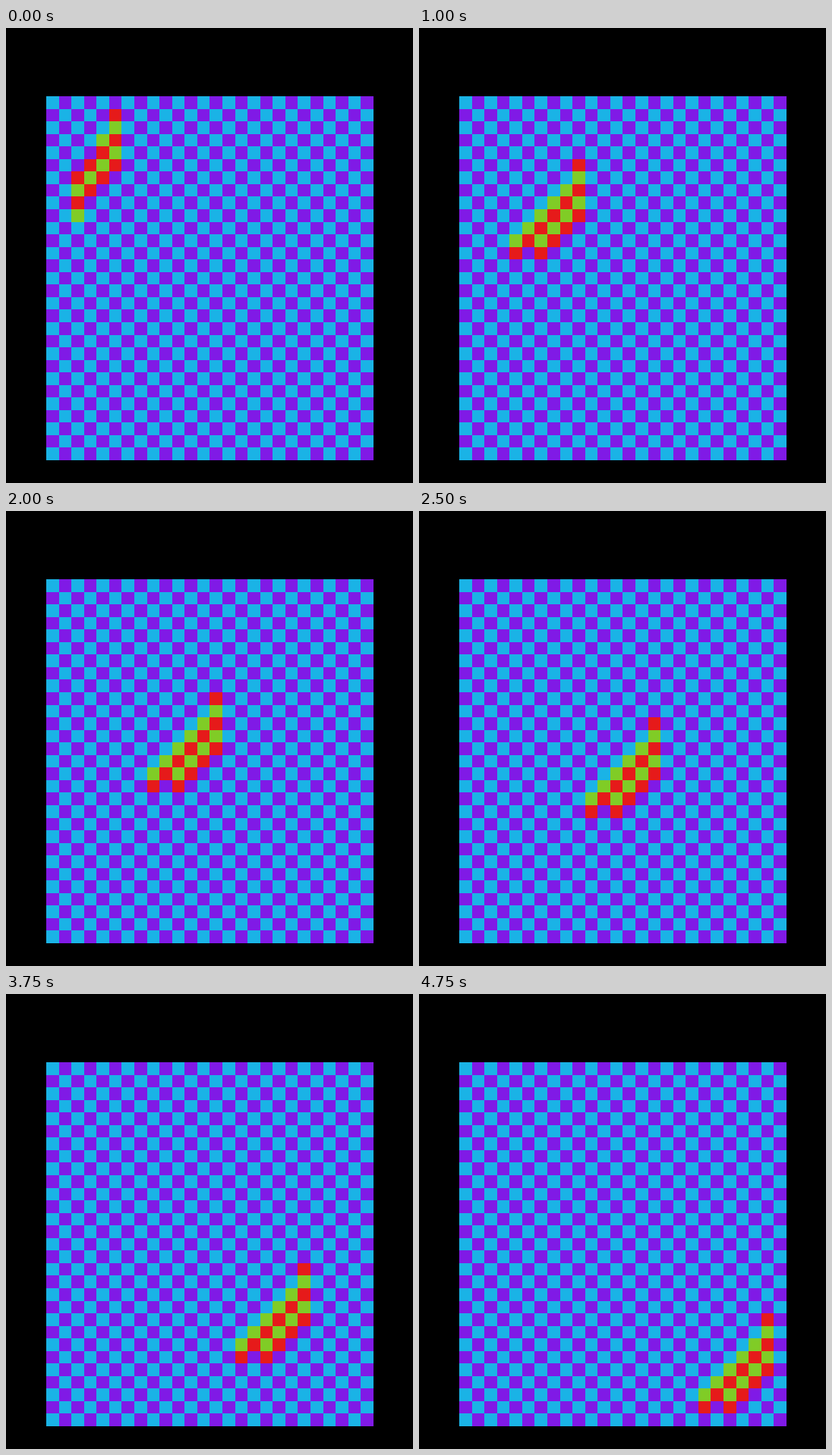
Animation, 536 px wide and 600 px high, one loop 5000 ms. Source, as an HTML page with a canvas:

```html
<!DOCTYPE html>
<html lang="en">
<head>
<meta charset="utf-8">
<title>Checkerboard glider</title>
<style>
  html, body { margin: 0; width: 100%; height: 100%; overflow: hidden; background: #000; }
  canvas { display: block; }
</style>
</head>
<body>
<canvas width="536" height="600"></canvas>
<script>
const COLS = 26, ROWS = 29, STEP_MS = 250, STEPS = 20;
const BOARD = ['#1ab3e6', '#801ae6'];
const LIT = ['#e61a1a', '#80cc26'];

const START = [
  '...#',
  '...#',
  '..##',
  '..##',
  '.###',
  '###.',
  '##..',
  '#...',
  '#...'
];
const GLIDER = [
  '.....#',
  '.....#',
  '....##',
  '...###',
  '..####',
  '.####.',
  '####..',
  '#.#...'
];

const ctx = document.querySelector('canvas').getContext('2d');
const edgeX = col => Math.round(52.95 + 16.575 * col);
const edgeY = row => Math.round(90 + 16.553 * row);

function fillCell(col, row, colors) {
  const x = edgeX(col), y = edgeY(row);
  ctx.fillStyle = colors[(col + row) % 2];
  ctx.fillRect(x, y, edgeX(col + 1) - x, edgeY(row + 1) - y);
}

function drawShape(shape, left, top) {
  shape.forEach((line, row) => [...line].forEach((mark, col) => {
    if (mark === '#') fillCell(left + col, top + row, LIT);
  }));
}

function draw(step) {
  ctx.fillStyle = '#000';
  ctx.fillRect(0, 0, 536, 600);
  for (let row = 0; row < ROWS; row++)
    for (let col = 0; col < COLS; col++) fillCell(col, row, BOARD);

  // The first pose differs; afterwards the glider moves one cell diagonally per step.
  if (step === 0) drawShape(START, 2, 1);
  else drawShape(GLIDER, step, step + 1);
}

const begin = performance.now();
let shown = -1;

function tick() {
  const step = Math.floor((performance.now() - begin) / STEP_MS) % STEPS;
  if (step !== shown) draw(shown = step);
  requestAnimationFrame(tick);
}
tick();
</script>
</body>
</html>
```
